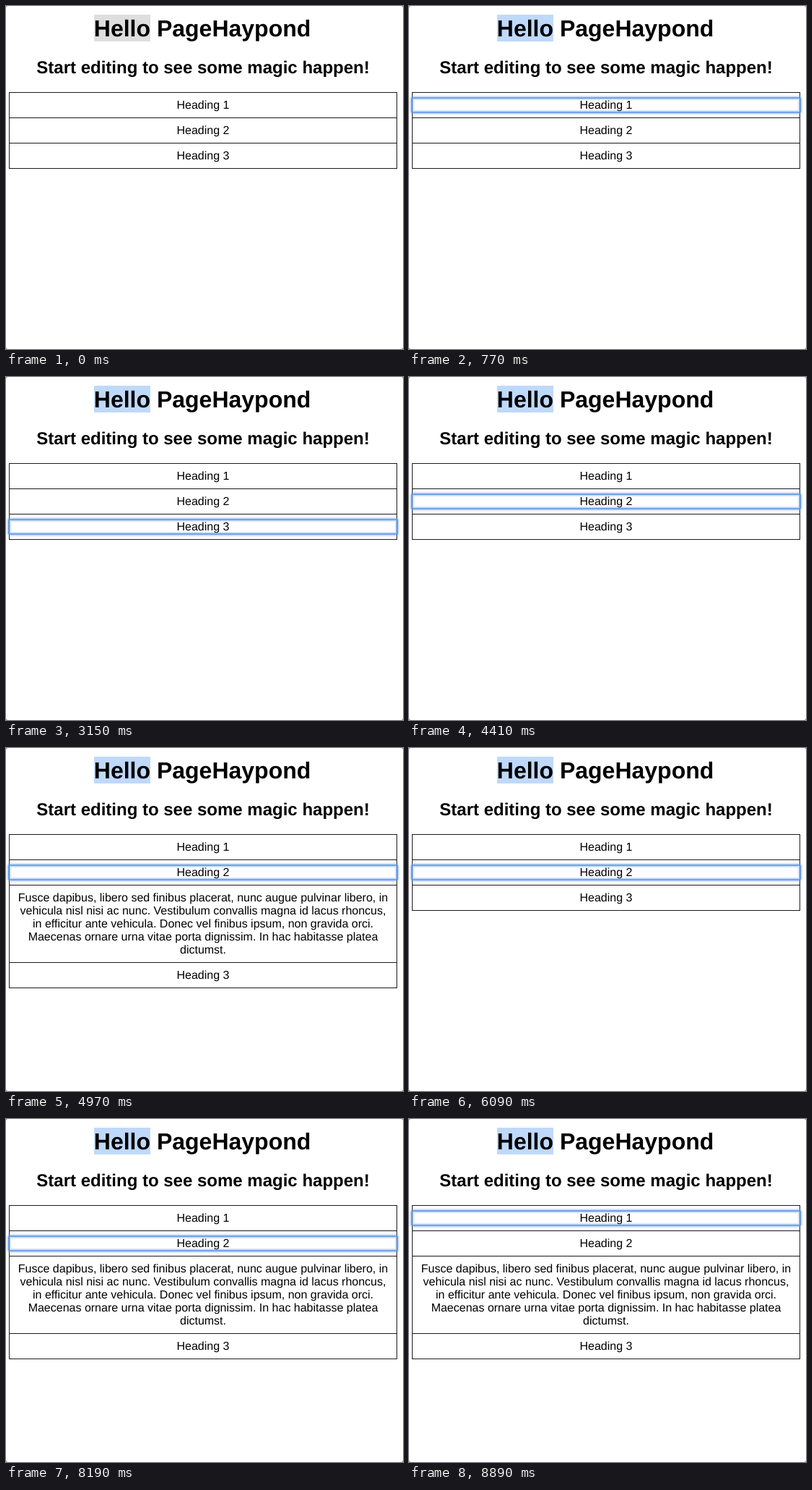
An HTML page for the animation above (9940 ms loop, 550x474 px).

```html
<!DOCTYPE html>
<html lang="en">
<head>
<meta charset="utf-8">
<title>Accordion keyboard navigation</title>
<style>
  html, body { margin: 0; height: 100%; overflow: hidden; background: #8c8c8c; }
  svg { display: block; width: 550px; height: 474px; background: #fff; border-radius: 3px; }
  text { font: 16px "Liberation Sans", Arial, sans-serif; text-anchor: middle; text-rendering: geometricPrecision; }
  .title { font-size: 32px; font-weight: bold; text-anchor: start; }
  .subtitle { font-size: 24px; font-weight: bold; }
  .box { fill: none; stroke: #1c1c1c; }
  #ring { fill: none; stroke: #5b94e6; }
</style>
</head>
<body>
<svg viewBox="0 0 550 474">
  <rect id="selection" x="122" y="12" width="78" height="37"/>
  <text class="title" x="121.8" y="42">Hello PageHaypond</text>
  <text class="subtitle" x="273" y="93">Start editing to see some magic happen!</text>
  <g id="rows"></g>
  <g id="panel"></g>
  <g id="ring">
    <rect x="4" y="8" width="538" height="20" rx="2" stroke-width="7" opacity=".13"/>
    <rect x="4" y="8" width="538" height="20" rx="2" stroke-width="4.5" opacity=".3"/>
    <rect x="4" y="8" width="538" height="20" rx="1" stroke-width="2" opacity=".75"/>
  </g>
</svg>
<script>
const LOOP = 9940, TOP = 119, ROW = 35, PANEL = 107;
const PANEL_LINES = [
  'Fusce dapibus, libero sed finibus placerat, nunc augue pulvinar libero, in',
  'vehicula nisl nisi ac nunc. Vestibulum convallis magna id lacus rhoncus,',
  'in efficitur ante vehicula. Donec vel finibus ipsum, non gravida orci.',
  'Maecenas ornare urna vitae porta dignissim. In hac habitasse platea',
  'dictumst.'
];
// [start time, value]
const FOCUS = [[0, -1], [770, 0], [2660, 1], [3150, 2], [4410, 1], [7140, 2], [8190, 1], [8890, 0]];
const OPEN = [[0, false], [4970, true], [6090, false], [6510, true]];

const $ = id => document.getElementById(id);
const valueAt = (track, t) => track.findLast(([start]) => start <= t)[1];
const box = height => `<rect class="box" x="4.5" y=".5" width="537" height="${height}"/>`;
const line = (text, y) => `<text x="273" y="${y}">${text}</text>`;
const moveTo = (el, y) => el.setAttribute('transform', `translate(0 ${y})`);

$('rows').innerHTML = [1, 2, 3].map(n => `<g>${box(ROW)}${line('Heading ' + n, 23)}</g>`).join('');
$('panel').innerHTML = box(PANEL) + PANEL_LINES.map((text, i) => line(text, 23 + 18 * i)).join('');
moveTo($('panel'), TOP + 2 * ROW);

function draw(t) {
  const focus = valueAt(FOCUS, t), open = valueAt(OPEN, t);
  const rowTop = i => TOP + i * ROW + (open && i === 2 ? PANEL : 0);
  [...$('rows').children].forEach((row, i) => moveTo(row, rowTop(i)));
  $('panel').style.display = open ? '' : 'none';
  $('ring').style.display = focus < 0 ? 'none' : '';
  moveTo($('ring'), rowTop(focus));
  $('selection').setAttribute('fill', focus < 0 ? '#dedede' : '#bfd9fb');
}

const start = performance.now();
function tick() {
  draw((performance.now() - start) % LOOP);
  requestAnimationFrame(tick);
}
tick();
</script>
</body>
</html>
```
